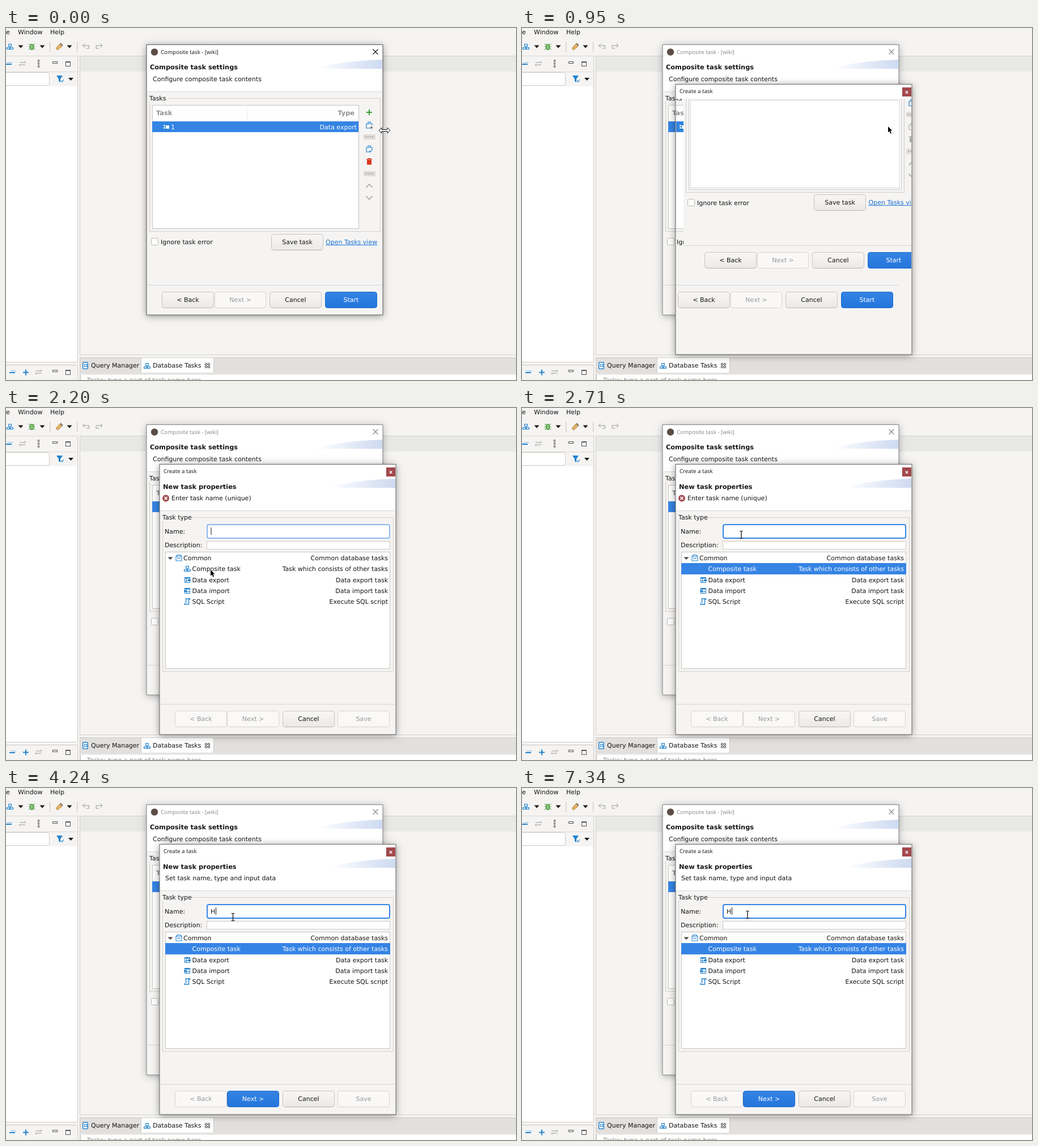
An HTML page with a canvas for the animation above (8000 ms loop, 900 by 622 pixels).

```html
<!DOCTYPE html>
<html lang="en">
<head>
<meta charset="utf-8">
<title>Create a task</title>
<style>
html, body { margin: 0; width: 100%; height: 100%; overflow: hidden; background: #f5f4f3; }
canvas { display: block; width: 900px; height: 622px; }
</style>
</head>
<body>
<canvas id="stage" width="900" height="622"></canvas>
<script>
const g = document.getElementById('stage').getContext('2d');
const LOOP = 8000;
const BG = '#f5f4f3', INK = '#161616', EDGE = '#cfcac6', BLUE = '#3584e4', ICON = '#2382cc', GREY = '#8e9192';
const UI = '"DejaVu Sans", sans-serif', CAPTION = '"Open Sans", sans-serif';

// ---- primitives ----
function text(s, x, y, color = INK, align = 'left', font = '11px ' + UI) {
  g.font = font;
  g.fillStyle = color;
  g.textAlign = align;
  g.fillText(s, x, y);
}
const bold = (s, x, y, color, align) => text(s, x, y, color, align, 'bold 11.35px ' + UI);
const caption = (s, x, y, color) => text(s, x, y, color, 'left', '9.7px ' + CAPTION);

function fill(x, y, w, h, color) {
  g.fillStyle = color;
  g.fillRect(x, y, w, h);
}
function frame(x, y, w, h, color = EDGE) {
  g.strokeStyle = color;
  g.lineWidth = 1;
  g.strokeRect(x + .5, y + .5, w - 1, h - 1);
}
function panel(x, y, w, h, color, edge) {
  fill(x, y, w, h, color);
  frame(x, y, w, h, edge);
}
function round(x, y, w, h, r, color, edge, lw = 1) {
  g.beginPath();
  g.roundRect(x + lw / 2, y + lw / 2, w - lw, h - lw, r);
  g.fillStyle = color;
  g.fill();
  g.strokeStyle = edge;
  g.lineWidth = lw;
  g.stroke();
}
// points: flat list of x, y pairs relative to (x, y)
function trace(x, y, pts) {
  g.beginPath();
  for (let i = 0; i < pts.length; i += 2) g.lineTo(x + pts[i], y + pts[i + 1]);
}
function poly(x, y, pts, color) {
  trace(x, y, pts);
  g.closePath();
  g.fillStyle = color;
  g.fill();
}
function line(x, y, pts, color, lw = 1) {
  trace(x, y, pts);
  g.strokeStyle = color;
  g.lineWidth = lw;
  g.stroke();
}
function disc(x, y, r, color) {
  g.beginPath();
  g.arc(x, y, r, 0, 7);
  g.fillStyle = color;
  g.fill();
}
function clipped(x, y, w, h, draw) {
  g.save();
  g.beginPath();
  g.rect(x, y, w, h);
  g.clip();
  draw();
  g.restore();
}
function ramp(x0, y0, x1, y1, a, b) {
  const grad = g.createLinearGradient(x0, y0, x1, y1);
  grad.addColorStop(0, a);
  grad.addColorStop(1, b);
  return grad;
}

// ---- icons, each centred on (x, y) ----
const drop = (x, y) => poly(x, y, [-4.5, -2, 4.5, -2, 0, 3], INK);
const cross = (x, y, r, color, lw) => {
  line(x, y, [-r, -r, r, r], color, lw);
  line(x, y, [r, -r, -r, r], color, lw);
};
const plus = (x, y, r, color, lw) => {
  line(x, y, [-r, 0, r, 0], color, lw);
  line(x, y, [0, -r, 0, r], color, lw);
};
function composite(x, y) {
  panel(x - 3, y - 5, 6, 5, '#d3e7f7', ICON);
  panel(x - 6, y + 1, 6, 4, '#d3e7f7', ICON);
  panel(x, y + 1, 6, 4, '#d3e7f7', ICON);
  line(x, y, [0, -.5, 0, 2], ICON);
}
function swap(x, y) {
  line(x, y, [-5, -2, 6, -2, 3.5, -4.5], '#999');
  line(x, y, [5, 2, -6, 2, -3.5, 4.5], '#999');
}
function minMax(x, y) {
  frame(x - 27, y - 4, 9, 4, '#555');
  frame(x - 4, y - 4, 9, 9, '#555');
  line(x, y, [-4, -2.5, 5, -2.5], '#555');
}
const collapse = (x, y) => {
  line(x, y, [-4, -2, 6, -2], '#7fb5e2');
  line(x, y, [-6, 1, 4, 1], ICON, 2);
};
function undo(x, y, d) {
  line(x, y, [-6 * d, -2, 5 * d, -2, 5 * d, 3, 0, 3], '#969696');
  line(x, y, [-2.5 * d, -5.5, -6 * d, -2, -2.5 * d, 1.5], '#969696');
}
function bug(x, y) {
  for (const k of [-4, 0, 4]) line(x, y, [-6, k * 1.2, 0, k * .6, 6, k * 1.2], '#4a9a3c');
  g.beginPath();
  g.ellipse(x, y + .5, 3.2, 4.8, 0, 0, 7);
  g.fillStyle = '#8cc47c';
  g.fill();
  g.strokeStyle = '#39892c';
  g.lineWidth = 1.2;
  g.stroke();
}
function brush(x, y) {
  poly(x, y, [-6, 3, 1, -5, 5, -1, -3, 6], '#e5b566');
  line(x, y, [-6, 3, 1, -5, 5, -1, -3, 6, -6, 3], '#a97b35');
  line(x, y, [2, -6, 6, -2], '#777', 2);
}
const sepDots = x => { for (let y = 25; y < 43; y += 3) fill(x, y, 1.3, 1.5, '#aaa'); };
function funnel(x, y) {
  poly(x, y, [-6, -6, 5, -6, 1, 0, 1, 6, -2, 4, -2, 0], ICON);
  line(x, y, [2, 3, 4, 5, 7, 1], ICON, 1.2);
}
function job(x, y, off, mark) {
  const c = off ? '#b3b3b3' : ICON;
  line(x, y, [2, 5, -5, 5, -5, -3, 5, -3, 5, 0], c, 1.2);
  line(x, y, [-2, -3, -2, -6, 2, -6, 2, -3], c, 1.2);
  if (mark === '+') plus(x + 4, y + 4, 2.5, off ? c : '#555', 1.2);
  else line(x, y, [0, 3, 2, 5, 6, 0], c, 1.2);
}
function bin(x, y, color) {
  fill(x - 4, y - 3, 8, 8.5, color);
  fill(x - 5, y - 5, 10, 1.5, color);
  fill(x - 2, y - 6, 4, 1.5, color);
}
function grip(x, y) {
  fill(x - 10, y - 4.5, 21, 9, '#dedcda');
  for (let i = 0; i < 4; i++) fill(x - 7 + i * 4, y - 1, 1.6, 1.6, '#8c8c8c');
}
function grid(x, y, dir) {
  panel(x - 5, y - 5, 10, 10, '#fff', ICON);
  fill(x - 5, y - 5, 10, 2.5, ICON);
  line(x, y, [-5, 1.5, 5, 1.5], ICON);
  line(x, y, [-1.5, -3, -1.5, 5], ICON);
  fill(dir > 0 ? x + 1 : x - 6, y - 1, 5, 2.5, ICON);
}
function script(x, y) {
  line(x, y, [-2.5, 3, -2.5, -5, 4.5, -5, 4.5, -3], ICON, 1.4);
  line(x, y, [2.5, -5, 2.5, 5, -5, 5, -5, 3], ICON, 1.4);
}
function bag(x, y) {
  line(x, y, [-5, -3, 5, -3, 5, 5, -5, 5, -5, -3, -2, -5.5, 2, -5.5, 5, -3], ICON, 1.1);
  line(x, y, [-2, -1, -2, 1, 2, 1, 2, -1], ICON);
}

// ---- widgets ----
// kind: 0 normal, 1 disabled, 2 primary; mix blends disabled into primary
function button(label, x, y, kind = 0, mix = 1, w = 92) {
  const h = 29, mid = x + w / 2;
  if (kind === 2 && mix < 1) {
    button(label, x, y, 1, 1, w);
    round(x, y, w, h, 4, `rgba(53,132,228,${mix})`, `rgba(27,106,203,${mix})`);
    text(label, mid, y + 18, '#92999f', 'center');
    return;
  }
  const look = [['#f8f7f6', '#ebe9e7', '#c9c3be', INK],
                ['#faf9f8', '#f9f8f7', '#d8d3cf', '#969999'],
                ['#3584e4', '#2375dc', '#1b6acb', '#fff']][kind];
  round(x, y, w, h, 4, ramp(0, y, 0, y + h, look[0], look[1]), look[2]);
  if (!kind) line(x, y, [4, h - .5, w - 4, h - .5], '#b9b2ac');
  text(label, mid, y + 18, look[3], 'center');
}
function buttons(x, y) {
  button('< Back', x, y);
  button('Next >', x + 93, y, 1, 1, 91);
  button('Cancel', x + 190, y);
  button('Start', x + 288, y, 2);
}
function swoosh(rx, y) {
  g.beginPath();
  g.moveTo(rx - 118, y + 16);
  g.quadraticCurveTo(rx - 75, y + 2, rx, y);
  g.lineTo(rx, y + 16);
  g.fillStyle = ramp(rx - 118, 0, rx, 0, '#fff', '#cddaf1');
  g.fill();
}
// edges fall between pixels, so the outline is soft
function windowBox(x, y, edge, shade) {
  g.save();
  g.shadowColor = `rgba(0,0,0,${shade})`;
  g.shadowBlur = 12;
  g.shadowOffsetY = 2;
  fill(x, y, 417, 478, BG);
  g.restore();
  g.strokeStyle = edge;
  g.lineWidth = 1;
  g.strokeRect(x, y + .5, 417, 477.5);
}
function group(x, y, w, h, label, gap) {
  frame(x, y, w, h, '#d3cfcb');
  fill(x - 1, y - 6, gap, 12, BG);
  text(label, x, y + 4);
}
function checkbox(x, y) {
  round(x, y, 13, 13, 2, '#fff', '#bdb7b1');
  text('Ignore task error', x + 17, y + 11);
}
function link(s, x, y) {
  text(s, x, y, '#1b72d6');
  fill(x, y + 1, g.measureText(s).width, 1, '#1b72d6');
}
function taskTools(x, dy, idle) {
  plus(x, 149 + dy, 5, '#3f9c35', 2);
  job(x, 172 + dy, false, '+');
  grip(x, 192.5 + dy);
  job(x, 214 + dy, idle);
  bin(x, 236 + dy, idle ? '#aaa' : '#d9361e');
  grip(x, 257.5 + dy);
  line(x, 279 + dy, [-5.5, 3, 0, -3, 5.5, 3], '#a0a0a0', 1.5);
  line(x, 300 + dy, [-5.5, -3, 0, 3, 5.5, -3], '#a0a0a0', 1.5);
}

// ---- scene ----
function workbench() {
  fill(0, 0, 900, 622, BG);
  text('e', 0, 11);
  text('Window', 21, 11);
  text('Help', 78, 11);
  composite(7, 33);
  drop(26, 32.5);
  bug(45.5, 33);
  drop(64, 32.5);
  sepDots(77);
  brush(94, 33);
  drop(112, 32.5);
  sepDots(125);
  undo(141.5, 33, 1);
  undo(164, 33, -1);

  line(0, 49.5, [0, 0, 127, 0], '#d9d5d2');
  collapse(6, 63);
  swap(29, 63);
  for (const y of [58, 63, 68]) {
    disc(57.5, y, 1.9, '#555');
    disc(57.5, y, .9, BG);
  }
  minMax(109, 63);
  line(0, 77.5, [0, 0, 126, 0], '#dedad7');
  round(-8, 78, 85, 24, 4, '#fff', EDGE);
  funnel(95, 90);
  drop(114.5, 90);
  fill(0, 103, 126, 487, '#fff');
  line(0, 590.5, [0, 0, 126.5, 0, 126.5, -541], EDGE);
  line(0, 595.5, [0, 0, 126.5, 0, 126.5, 27], EDGE);
  collapse(12, 608);
  plus(35, 608.5, 5, ICON, 2);
  swap(57.5, 608);
  minMax(109, 608);

  fill(130, 50, 770, 27, '#e8e8e7');
  line(130.5, 49.5, [770, 0, 0, 0, 0, 528, 770, 528], '#d6d2cf');

  fill(130, 582, 770, 28, '#e2e0de');
  line(130.5, 582.5, [770, 0, 0, 0, 0, 40], EDGE);
  fill(239, 583, 128, 27, '#fff');
  line(238.5, 583, [0, 0, 0, 27], EDGE);
  line(366.5, 583, [0, 0, 0, 27], EDGE);
  line(131, 609.5, [0, 0, 769, 0], '#dedad7');
  round(135, 590, 10, 13, 1, '#fff', ICON, 1.5);
  frame(138, 594, 5, 5, ICON);
  text('Query Manager', 150, 600);
  composite(249, 597);
  text('Database Tasks', 259, 600);
  cross(355.5, 596.5, 3.8, '#333', 3.6);
  cross(355.5, 596.5, 3.4, '#fff', 1.4);
  round(131, 611, 790, 30, 3, '#fff', EDGE);
  text('Tasks: type a part of task name here', 143, 626, '#8d8d8d');
}

function settingsBody() {
  group(253, 124, 408, 236, 'Tasks', 34);
  panel(258, 136, 365, 219, '#fff', '#c8c4c0');
  bold('Task', 265, 154, GREY);
  bold('Type', 615, 154, GREY, 'right');
  line(425.5, 138, [0, 0, 0, 26], '#ececec');
  fill(258, 165, 364, 19, BLUE);
  fill(277, 170, 10, 10, ICON);
  fill(282, 172, 6, 6, '#fff');
  fill(278, 171, 3, 3, '#cfe4f6');
  fill(278, 175, 3, 3, '#cfe4f6');
  text('1', 291, 179, '#fff');
  text('Data export', 619, 179, '#fff', 'right');
  taskTools(641, 0, false);
  checkbox(256, 371);
  button('Save task', 468, 364);
  link('Open Tasks view', 564, 382);
  line(249, 454.5, [0, 0, 415, 0], '#d9d5d2');
  buttons(275, 466);
}
function settings(active) {
  const tone = active ? '#111' : '#858585';
  windowBox(248, 29, active ? '#5a5a5a' : '#858585', active ? .42 : .32);
  fill(249, 30, 415, 82, '#fff');
  line(249, 112.5, [0, 0, 415, 0], '#dbd7d4');
  disc(262, 42.5, 6.2, '#5b4d46');
  caption('Composite task - [wiki]', 273, 46, tone);
  cross(652, 42, 4.5, tone, 1.1);
  bold('Composite task settings', 254, 73);
  text('Configure composite task contents', 259, 94);
  swoosh(664, 56);
  settingsBody();
}

function createTitle() {
  fill(272, 100, 415, 25, '#fff');
  caption('Create a task', 278, 115, '#111');
  fill(671, 105, 16, 16, '#a2484c');
  cross(679, 113.5, 2.2, '#fff', 1.3);
}

// half painted window: leftovers of the one below show inside it
function stalePaint() {
  windowBox(271, 99, '#6a6a6a', .42);
  clipped(272, 119, 13, 300, settingsBody);
  clipped(272, 125, 415, 450, () => {
    frame(289, 110, 386, 181, '#d3cfcb');
    fill(296, 127, 373, 157, '#fff');
    g.setLineDash([1, 1]);
    frame(294, 124, 376, 162, '#a5a5a5');
    frame(297, 127, 370, 156, '#a5a5a5');
    g.setLineDash([]);
    taskTools(688, -39.5, true);
    checkbox(292, 302);
    button('Save task', 515, 294);
    link('Open Tasks view', 611.5, 312);
    line(285, 384.5, [0, 0, 403, 0], '#d9d5d2');
    buttons(322, 396);
    line(272, 454.5, [0, 0, 393, 0], '#d9d5d2');
    buttons(275, 466);
  });
  createTitle();
}

const ROWS = [
  ['Common', 'Common database tasks'],
  ['Composite task', 'Task which consists of other tasks', composite],
  ['Data export', 'Data export task', (x, y) => grid(x, y, 1)],
  ['Data import', 'Data import task', (x, y) => grid(x, y, -1)],
  ['SQL Script', 'Execute SQL script', script]
];
function createTask(t) {
  const typed = t >= 4010, picked = t >= 2400;
  windowBox(271, 99, '#6a6a6a', .42);
  createTitle();
  fill(272, 125, 415, 56, '#fff');
  line(272, 181.5, [0, 0, 415, 0], '#dbd7d4');
  swoosh(687, 125);
  bold('New task properties', 277, 143);
  if (typed) text('Set task name, type and input data', 281, 163);
  else {
    disc(282, 159.5, 6, '#a2484c');
    cross(282, 159.5, 2.6, '#fff', 1.5);
    text('Enter task name (unique)', 292, 163);
  }
  group(276, 193, 408, 273, 'Task type', 53);
  text('Name:', 280, 222);
  const edge = t < 1100 ? '#b5d0f1' : t < 2400 ? '#8cb8ec' : t < 2650 ? '#b4cdec' : BLUE;
  round(354, 205, 324, 26, 3, '#fff', edge, 2);
  const caret = t < 2400 || t >= 2940;
  if (typed) text('H', 361, 222);
  if (caret) fill(typed ? 370 : 361.5, 211, 1, 13, INK);
  text('Description:', 280, 246);
  panel(354, 235, 324, 15, '#fff', EDGE);

  panel(281, 254, 397, 207, '#fff', '#c8c4c0');
  if (picked) fill(281, 274, 397, 20, BLUE);
  ROWS.forEach(([name, info, icon], i) => {
    const y = Math.round(264.8 + i * 19.35), on = picked && i === 1, c = on ? '#fff' : INK;
    if (icon) { if (!on) icon(320, y); }
    else {
      poly(290, y, [-4.5, -1.5, 4.5, -1.5, 0, 3], '#444');
      bag(305, y);
    }
    text(name, icon ? 328.5 : 313, y + 4, c);
    text(info, 674, y + 4, c, 'right');
  });

  line(272, 523.5, [0, 0, 415, 0], '#d9d5d2');
  button('< Back', 298, 535, 1);
  const mix = Math.min(1, .17 + Math.floor(Math.max(0, t - 4010) / 46) * .166);
  button('Next >', 390, 535, typed ? 2 : 1, mix);
  button('Cancel', 488, 535);
  button('Save', 585, 535, 1);
}

// ---- pointer ----
// [start, end, steps, x, y]: the pointer hops to (x, y) in equal steps
const HOPS = [
  [180, 490, 7, 646, 174],
  [1330, 1460, 3, 515, 238],
  [1510, 1900, 8, 374, 296],
  [1950, 2120, 4, 367, 291],
  [2150, 2200, 2, 361, 286],
  [2450, 2710, 5, 387, 224],
  [3220, 3270, 2, 400.5, 228],
  [6980, 7060, 3, 398, 224]
];
const CLICKS = [[720, 870], [2400, 2500], [2940, 3040], [7210, 7340]];

function pointerAt(t) {
  let x = 668, y = 181;
  for (const [a, b, n, tx, ty] of HOPS) {
    if (t < a) break;
    const gap = (b - a) / (n - 1);
    const u = Math.min(1, (Math.floor((t - a) / gap + 1e-6) + 1) / n);
    x += (tx - x) * u;
    y += (ty - y) * u;
  }
  return [x, y];
}
function pointer(t) {
  const [x, y] = pointerAt(t);
  if (CLICKS.some(([a, b]) => t >= a && t < b)) disc(x, y, 10, 'rgba(255,255,0,.47)');
  if (x > 660) {
    const tip = [-10, 0, -5, -5, -5, -1.5, 5, -1.5, 5, -5, 10, 0, 5, 5, 5, 1.5, -5, 1.5, -5, 5, -10, 0];
    poly(x, y, tip, '#fff');
    line(x, y, tip, '#111');
  } else if (t > 1100 && y > 205 && y < 250) {
    line(x, y, [-3, -6.5, 3, -6.5], '#222');
    line(x, y, [-3, 6.5, 3, 6.5], '#222');
    line(x, y, [0, -6.5, 0, 6.5], '#222', 1.4);
  } else {
    const tip = [0, 0, 0, 10.5, 2.4, 8.3, 4.2, 12.5, 6, 11.7, 4.2, 7.6, 7.4, 7.4, 0, 0];
    line(x, y, tip, '#fff', 1.6);
    poly(x, y, tip, '#000');
  }
}

function draw(t) {
  g.textRendering = 'geometricPrecision';
  workbench();
  settings(t < 870);
  if (t >= 1020) createTask(t);
  else if (t >= 950) stalePaint();
  pointer(t);
}
function tick() {
  draw(performance.now() % LOOP);
  requestAnimationFrame(tick);
}
tick();
</script>
</body>
</html>
```
